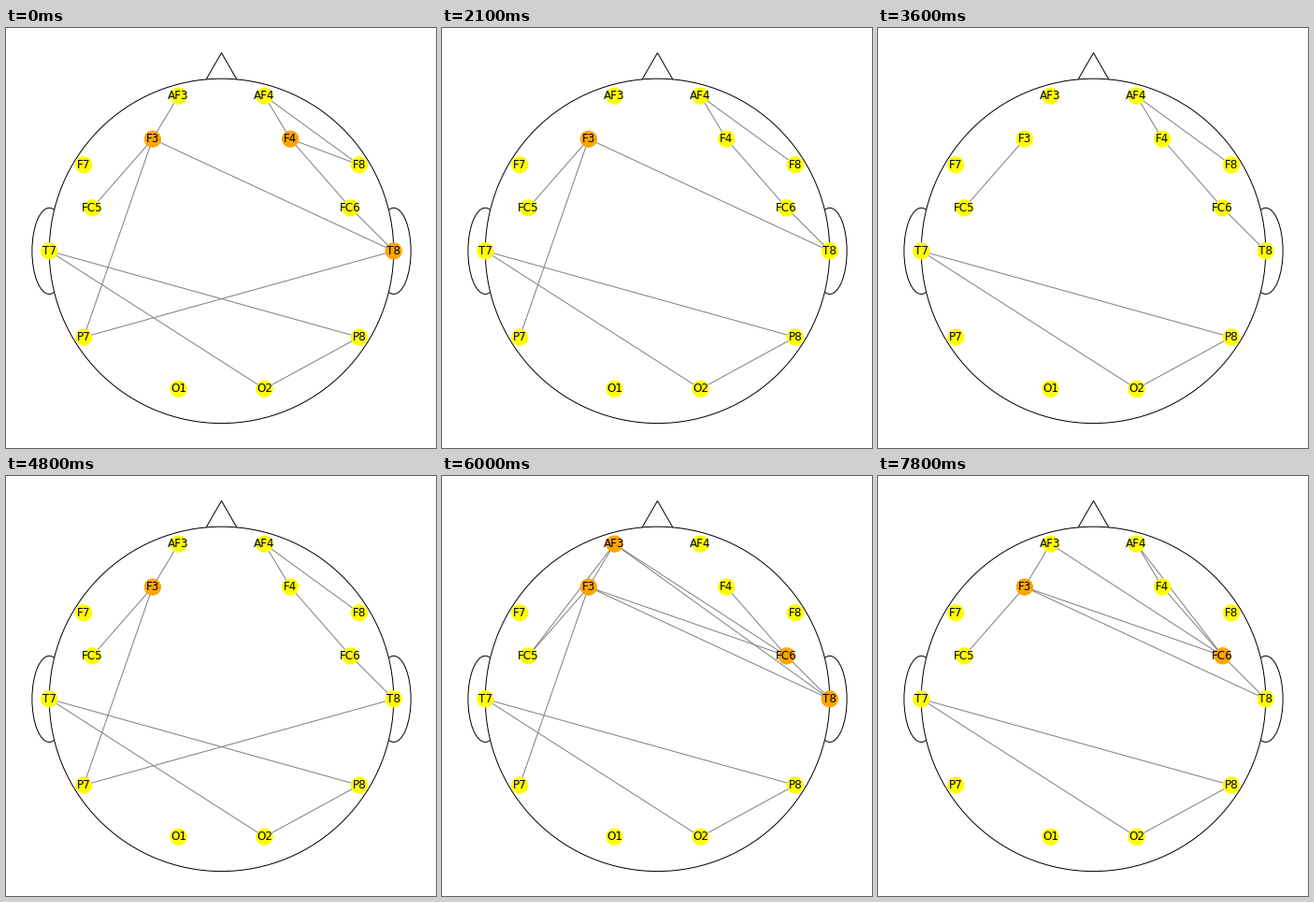
Recreate the animation shown at these times as a matplotlib script. Size 460 by 449 pixels, loop 8000 ms.

```python
import numpy as np
import matplotlib.pyplot as plt
from matplotlib.animation import FuncAnimation
from matplotlib.collections import LineCollection
from matplotlib.patches import Circle, Ellipse, RegularPolygon

W, H, DPI = 460, 449, 72
CX, CY, R = 230.5, 238.4, 184.2      # head centre and radius in pixels
LOOP, STEP = 8000, 100               # ms
HUB_DEGREE = 3

# Right half of the montage; the left half mirrors it.
RIGHT = {"AF4": (.25, .9), "F4": (.4, .65), "F8": (.8, .5), "FC6": (.75, .25),
         "T8": (1, 0), "P8": (.8, -.5), "O2": (.25, -.8)}
LEFT_NAME = {"AF4": "AF3", "F4": "F3", "F8": "F7", "FC6": "FC5",
             "T8": "T7", "P8": "P7", "O2": "O1"}
POS = dict(RIGHT)
POS.update({LEFT_NAME[n]: (-x, y) for n, (x, y) in RIGHT.items()})
NAMES = list(POS)

START = ("AF3-F3 F3-FC5 F3-P7 F3-T8 AF4-F4 AF4-F8 F4-F8 F4-FC6 FC6-T8 "
         "P7-T8 T7-P8 T7-O2 P8-O2")

# Links switched on or off at each time (ms).
TOGGLES = {
    300: "F3-T8",
    600: "F4-T8",
    900: "F4-T8 F4-F8",
    1200: "F3-T8 P7-O1 P7-T8 F4-F8",
    1500: "P7-O1 F3-T8 F4-T8",
    2100: "AF3-F3 F3-T8 F4-T8 F4-F8",
    2400: "AF3-F3",
    3000: "AF3-F3 F4-T8",
    3300: "F3-P7",
    3600: "F3-T8 F4-T8",
    4200: "AF3-F3 F3-P7 P7-T8 F4-T8 AF4-F8",
    4500: "AF4-F8",
    4800: "F4-T8",
    5100: "P7-T8 AF4-F8 F3-T8",
    5400: "P7-T8 AF4-F4 AF3-FC6",
    5700: "P7-T8 AF3-T8",
    6000: "AF3-FC5 F3-FC6",
    6300: "AF4-F4 AF4-FC6 AF3-AF4",
    6600: "F3-P7",
    6900: "FC5-T8",
    7200: "FC5-T8 AF3-FC5",
    7500: "AF3-AF4",
    7800: "AF3-T8",
}


def links_at(ms):
    links = set(START.split())
    for when, names in TOGGLES.items():
        if when <= ms:
            links ^= set(names.split())
    return [link.split("-") for link in sorted(links)]


# The small surplus keeps the pixel size from rounding down.
fig = plt.figure(figsize=((W + .01) / DPI, (H + .01) / DPI), dpi=DPI,
                 facecolor="white")
ax = fig.add_axes([0, 0, 1, 1])
ax.set_xlim(-CX / R, (W - CX) / R)
ax.set_ylim((CY - H) / R, CY / R)
ax.axis("off")

outline = dict(facecolor="white", edgecolor="black", linewidth=1)
for side in (-1, 1):
    ax.add_patch(Ellipse((side, 0), .2, .5, zorder=0, **outline))
ax.add_patch(RegularPolygon((0, 1), 3, radius=.15, zorder=0, **outline))
ax.add_patch(Circle((0, 0), 1, zorder=1, **outline))

edges = LineCollection([], colors="gray", linewidths=1, zorder=2)
ax.add_collection(edges, autolim=False)
nodes = ax.scatter(*np.array([POS[n] for n in NAMES]).T, s=300,
                   c="yellow", linewidths=1, zorder=3)
for name in NAMES:
    ax.text(*POS[name], name, family="DejaVu Sans", size=12,
            ha="center", va="center", zorder=4)


def draw(frame):
    links = links_at(frame * STEP)
    edges.set_segments([(POS[a], POS[b]) for a, b in links])
    degree = {n: sum(n in link for link in links) for n in NAMES}
    colors = ["orange" if degree[n] >= HUB_DEGREE else "yellow" for n in NAMES]
    nodes.set_facecolor(colors)
    nodes.set_edgecolor(colors)
    return edges, nodes


anim = FuncAnimation(fig, draw, frames=LOOP // STEP, interval=STEP,
                     repeat=True, repeat_delay=0)
plt.show()
```
